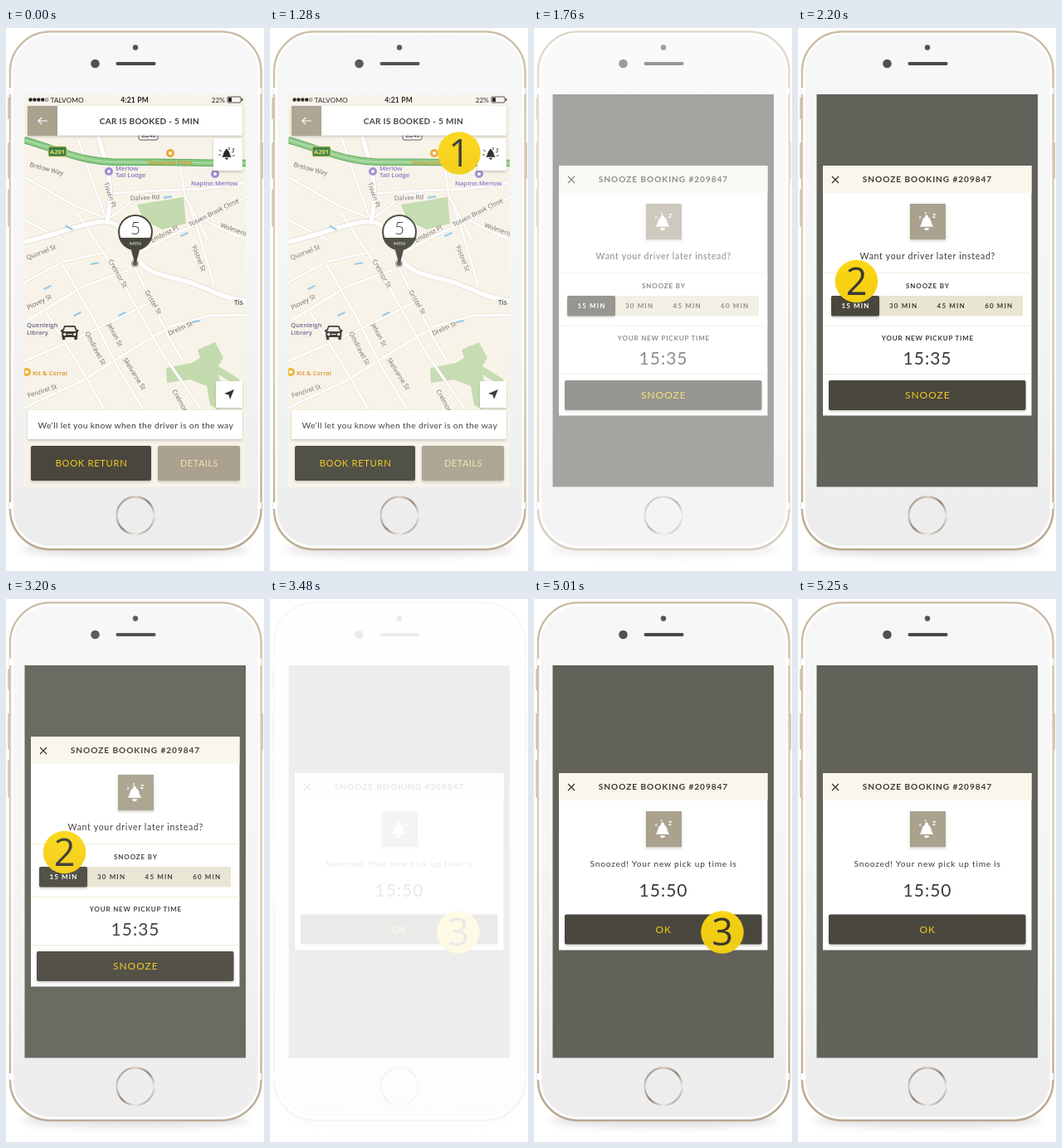
Write an HTML page that moves like this. It is 311 px wide and 655 px high and loops after 5.37 s.

```html
<!DOCTYPE html>
<html lang="en">
<head>
<meta charset="utf-8">
<title>Snooze a booking</title>
<style>
html, body { margin: 0; width: 100%; height: 100%; overflow: hidden; background: #fff; }
svg { display: block; width: 311px; height: 655px; }
text { font-family: Lato, "Open Sans", sans-serif; }
.badge text { font-family: "Open Sans", "Noto Sans", sans-serif; }
.map text { font-family: "Open Sans", sans-serif; }
</style>
</head>
<body>
<svg id="stage" viewBox="0 0 311 655"></svg>
<script>
const DARK = '#48473e', TAN = '#aaa18f', GOLD = '#f2cb1d', INK = '#3b3a34', CREAM = '#f9f6ec';

const rect = (x, y, w, h, fill, extra = '') =>
  `<rect x="${x}" y="${y}" width="${w}" height="${h}" fill="${fill}" ${extra}/>`;
const dot = (x, y, r, fill, extra = '') =>
  `<circle cx="${x}" cy="${y}" r="${r}" fill="${fill}" ${extra}/>`;
const line = (d, color, width, extra = '') =>
  `<path d="${d}" fill="none" stroke="${color}" stroke-width="${width}" ${extra}/>`;
const text = (s, x, y, size, { fill = INK, weight = 400, space = 0, anchor = 'middle', turn = 0 } = {}) =>
  `<text transform="translate(${x} ${y}) rotate(${turn})" font-size="${size}" fill="${fill}"
    font-weight="${weight}" letter-spacing="${space}" text-anchor="${anchor}">${s}</text>`;
const SHADOW = 'filter="url(#shadow)"';

const bell = (x, y, s, fill) => `<g transform="translate(${x} ${y}) scale(${s})" fill="${fill}">
  <path d="M-9 5C-5 2-7-7 0-8 7-7 5 2 9 5Z"/><circle cy="-8" r="2"/><path d="M-3 6.5H3A3 3 0 0 1-3 6.5Z"/></g>`;

function phone() {
  const side = (x, y, h) => rect(x, y, 2.5, h, '#cfc2ae', 'rx="1"');
  const bands = [[4, 72], [4, 572], [303.5, 72], [303.5, 572]];
  return `
    <ellipse cx="156" cy="629" rx="138" ry="9" fill="#999" opacity=".28" filter="url(#soft)"/>
    ${side(2.2, 84, 26)}${side(2.2, 138, 44)}${side(2.2, 194, 46)}${side(307.5, 138, 44)}
    ${rect(5, 4.5, 302.5, 624.5, 'url(#body)', 'rx="48" stroke="url(#rim)" stroke-width="2.6"')}
    ${rect(7.5, 7, 297.5, 619, 'none', 'rx="45.5" stroke="#fff" stroke-width="2.4"')}
    ${bands.map(([x, y]) => rect(x, y, 4.5, 8, '#fff')).join('')}
    ${dot(156, 23.5, 3.2, '#55524f')}${dot(107.5, 43, 5.3, '#55504d')}
    ${rect(132.5, 41, 48, 4, '#4b4744', 'rx="2"')}
    ${dot(156, 588, 22.5, 'none', 'stroke="url(#ring)" stroke-width="2.4"')}`;
}

function map() {
  const small = [
    'M22 180L82 214 122 230', 'M22 307L68 282 122 270', 'M22 355L92 312 148 292',
    'M22 402L77 378 132 352 173 331', 'M22 458L95 424 152 388 198 360 245 347 289 346',
    'M85 222L139 304 187 390 235 460', 'M66 282L105 350 133 406 165 460',
    'M48 342L102 430 118 460', 'M153 284L197 374 213 402', 'M122 200L184 196 238 194 289 186',
    'M122 232L157 205 185 200', 'M160 271L200 250 240 232 289 204', 'M217 205L230 240 251 310',
    'M240 232L289 256', 'M86 132L104 184 120 229', 'M210 165L216 204 245 258', 'M23 232L70 256'];
  const oneWay = [[50, 313, -27], [86, 345, -28], [144, 235, 25], [76, 241, 28], [215, 249, -25],
    [195, 204, -8], [229, 354, -12], [140, 345, -24], [107, 284, -10]];
  const labels = [
    ['Brelow Way', 28, 167, 15], ['Tisven Pl', 118, 187, 72], ['Dalvex Rd', 150, 208, -3],
    ['Quorvel St', 26, 280, -22], ['Embrist Pl', 176, 259, -27], ['Tolven Brask Close', 222, 240, -27],
    ['Wolmerd', 258, 240, 19], ['Yostrel St', 224, 263, 69], ['Crelmor St', 123, 281, 60],
    ['Plovey St', 27, 340, -27], ['Gristel St', 167, 318, 60], ['Drelm St', 197, 371, -24],
    ['Omdravel St', 95, 368, 62], ['Jelvan St', 122, 358, 62], ['Skelvarne St', 141, 400, 58],
    ['Fenzirel St', 27, 446, -18], ['Crelmor', 200, 438, 60]];
  const main = 'M22 258C65 248 85 238 112 234S145 252 157 276 201 299 225 308 262 326 289 329';
  const rodney = 'M111 130C119 160 132 188 122 233';
  const green = 'M22 135C50 143 70 152 98 158S150 161 200 162 250 163 289 163';
  const place = (s, x, y, fill) => text(s, x, y, 7.6, { fill, weight: 600, anchor: 'start' });
  const pin = (x, y, fill) => dot(x, y, 5, fill) + dot(x, y, 2, '#fff');
  return `<g class="map" clip-path="url(#screen)">
    ${rect(22, 80, 267, 381, '#f8f3e8')}
    <path d="M158 213L214 204 217 236 188 243 166 232Z M231 388L252 379 262 398 256 408 282 424 276 430 256 418 262 440 256 460 246 455 242 432 222 424 194 428 193 410 224 404 234 398Z" fill="#c3dbae"/>
    ${small.map(d => line(d, '#e2dcd2', 3.8) + line(d, '#fff', 2.8)).join('')}
    ${[main, rodney].map(d => line(d, '#ddd7cc', 7) + line(d, '#fff', 5.6)).join('')}
    ${line(green, '#5da660', 8.5) + line(green, '#8bcb85', 6.5) + line(green, '#c5e5bc', 1)}
    ${oneWay.map(([x, y, a]) => rect(-5, -1.2, 10, 2.4, '#9bcde6', `transform="translate(${x} ${y}) rotate(${a})"`)).join('')}
    ${rect(51, 143, 22, 12, '#317e49', 'rx="2" stroke="#e8cc59"')}
    ${text('A201', 62, 152, 7.5, { fill: '#f8de53', weight: 700 })}
    ${rect(160, 123, 23, 12, '#fff', 'rx="2" stroke="#555"')}${text('B240', 172, 132, 7.5, { weight: 600 })}
    ${labels.map(([s, x, y, turn]) => text(s, x, y, 7.7, { turn, fill: '#67645f', anchor: 'start' })).join('')}
    ${text('Tis', 275, 334, 8, { fill: '#555', weight: 600, anchor: 'start' })}
    ${pin(124, 173, '#9a8bd3')}${place('Merlow', 132, 172, '#8271c5')}${place('Tall Lodge', 132, 180, '#8271c5')}
    ${pin(252, 176, '#9a8bd3')}${place('NapInn Merlow', 223, 190, '#8271c5')}
    ${pin(198, 151, '#e8a83c')}${place('Tamarind Plate', 170, 165, '#d59024')}
    ${place('Quenleigh', 25, 361, '#6a6590')}${place('Library', 25, 370, '#6a6590')}
    ${pin(25, 415, '#edb72d')}${place('Kit &amp; Corral', 32, 419, '#d59024')}
  </g>`;
}

function car() {
  return `<g transform="translate(76.8 367)" fill="#3a3934">
    <path d="M-6.5-8H6.5L9.5-1V6H-9.5V-1Z"/><path d="M-11-3H-8V0H-10ZM11-3H8V0H10ZM-9 5H-5.5V9H-9ZM9 5H5.5V9H9Z"/>
    <path d="M-5.5-6.3H5.5L7.5-1H-7.5Z" fill="#f4eee3"/>
    <circle cx="-6" cy="2.5" r="1.7" fill="#f4eee3"/><circle cx="6" cy="2.5" r="1.7" fill="#f4eee3"/>
    <path d="M-3 2.5H3" stroke="#f4eee3"/></g>`;
}

function marker() {
  return `${dot(155.5, 284, 4.5, '#aaa69d')}${dot(155.5, 284, 2.5, '#5c5a53')}
    <path d="M150 264L155 283H157L162 264Z" fill="${DARK}"/>
    ${dot(156, 246, 20, '#fff', `stroke="${DARK}" stroke-width="2"`)}
    <path d="M136 253H176A20.8 20.8 0 0 1 136 253Z" fill="${DARK}"/>
    ${text('5', 156, 249, 21, { weight: 300 })}${text('MIN', 156.3, 262, 6.5, { fill: '#fff', space: .6 })}`;
}

function booked() {
  const signal = [29.5, 34.4, 39.3, 44.2].map(x => dot(x, 86.5, 2.2, '#222')).join('');
  return `${map()}${rect(22, 461, 267, 92.5, '#f8f3ea')}${rect(22, 80, 267, 14, '#f8f3ea')}
    ${signal}${dot(49.1, 86.5, 1.8, 'none', 'stroke="#222" stroke-width=".7"')}
    ${text('TALVOMO', 53.5, 89.7, 8.4, { fill: '#222', anchor: 'start' })}
    ${text('4:21 PM', 155, 89.7, 8.5, { fill: '#222', weight: 700, space: .2 })}
    ${text('22%', 264, 89.7, 8.3, { fill: '#222', anchor: 'end' })}
    ${rect(267, 83, 16, 7, 'none', 'rx="1" stroke="#222" stroke-width=".8"')}
    ${rect(268, 84, 4, 5, '#222')}${rect(284, 85, 1.2, 3, '#222')}
    ${rect(26, 94, 259, 35.5, '#fff', SHADOW)}${rect(26, 94, 36, 36, TAN)}
    ${line('M50 112H39M43 108L39 112 43 116', '#fff', 1.2)}
    ${text('CAR IS BOOKED - 5 MIN', 173, 115.5, 10, { weight: 700, space: .34 })}
    ${rect(250, 133, 35, 39, '#fff', SHADOW)}${bell(266, 152.5, .65, '#292824')}
    ${line('M260 149L257 147M259 153H256M272 150L275 149M273 154H276', '#292824', .8)}
    ${text('z', 269, 147, 5, { weight: 700 })}${text('z', 274, 148, 6, { weight: 700 })}
    ${rect(253, 426, 32, 32, '#fff', SHADOW)}<path d="M275 436L270 448 268.5 442.5 263 441Z" fill="#33322e"/>
    ${car()}${marker()}
    ${rect(26, 461, 259, 35, '#fff', `rx="2" ${SHADOW}`)}
    ${text('We’ll let you know when the driver is on the way', 156.3, 482.5, 10.4, { space: .31 })}
    ${rect(30, 504, 145, 42, DARK, `rx="2" ${SHADOW}`)}
    ${text('BOOK RETURN', 103, 529, 11.2, { fill: GOLD, space: .68 })}
    ${rect(183, 504, 99, 42, TAN, `rx="2" ${SHADOW}`)}
    ${text('DETAILS', 233, 529, 11, { fill: '#f1e3b0', space: .5 })}`;
}

function dialog(top, height) {
  const icon = top + 69;
  return `${rect(22.5, 80, 266.5, 473.5, '#62615a')}
    ${rect(30, top, 251.5, height, '#fff')}${rect(30, top, 251.5, 33, CREAM)}
    ${line(`M41 ${top + 13}l8 8m0 -8l-8 8`, '#33322e', 1.2)}
    ${text('SNOOZE BOOKING #209847', 156, top + 20, 10.2, { weight: 700, space: .9 })}
    ${rect(135, top + 46, 43, 43, TAN, SHADOW)}${bell(155, icon, .95, '#fff')}
    ${text('z', 147, icon - 5, 6, { fill: '#fff', weight: 700 })}
    ${text('z', 154, icon - 10, 5, { fill: '#fff', weight: 700 })}
    ${text('z', 164, icon - 6, 9, { fill: '#fff', weight: 700 })}`;
}

const wideButton = (label, y) => rect(37, y, 237.5, 36, DARK, `rx="2" ${SHADOW}`) +
  text(label, 156.3, y + 22, 12, { fill: GOLD, space: 1 });
const pickupTime = (s, y) => text(s, 156, y, 21, { space: 1 });

function snooze() {
  const rules = [295.5, 359.5, 417.5].map(y => line(`M30 ${y}H281.5`, '#f3ebdd', 1)).join('');
  const choices = [15, 30, 45, 60].map((n, i) => text(`${n} MIN`, 69.5 + 57.6 * i, 338, 8,
    { weight: 700, space: 1.15, fill: i ? INK : '#fff' })).join('');
  return `${dialog(166, 301.5)}
    ${text('Want your driver later instead?', 156.3, 279, 10.6, { space: .67 })}${rules}
    ${text('SNOOZE BY', 156.4, 314, 8, { weight: 700, space: .85 })}
    ${rect(40, 323, 231, 24.5, '#e9e5d3')}${rect(40, 323, 58, 24.5, DARK, `rx="2" ${SHADOW}`)}${choices}
    ${text('YOUR NEW PICKUP TIME', 156.4, 377, 8, { weight: 700, space: .8 })}
    ${pickupTime('15:35', 406)}${wideButton('SNOOZE', 425)}`;
}

function snoozed() {
  return `${dialog(210, 213.5)}
    ${text('Snoozed! Your new pick up time is', 156.2, 323, 10.2, { space: .78 })}
    ${pickupTime('15:50', 358.5)}${wideButton('OK', 380.5)}`;
}

const badge = (n, x, y) => `<g class="badge">${dot(x, y, 25.8, 'url(#yellow)')}
  ${text(n, x, y + 16, 45, { fill: '#393833' })}</g>`;

const stops = (...colors) => colors.map((c, i) =>
  `<stop offset="${i / (colors.length - 1)}" stop-color="${c}"/>`).join('');
const screens = [booked() + badge(1, 228, 151), snooze() + badge(2, 70.5, 305.5), snoozed() + badge(3, 227, 402)];

const stage = document.getElementById('stage');
stage.innerHTML = `<defs>
  <linearGradient id="body" x2="0" y2="1">${stops('#f7f7f7', '#f5f5f5', '#ececec')}</linearGradient>
  <linearGradient id="rim" x2="0" y2="1">${stops('#c9baa2', '#d9ccb8', '#d5c7b2', '#b9a88f')}</linearGradient>
  <linearGradient id="ring" x2="1" y2="1">${stops('#7b6f66', '#d9cec4', '#8d7d70', '#efe9e4', '#77695d')}</linearGradient>
  <linearGradient id="yellow" x2="0" y2="1">${stops('#fbd714', '#f3cd12')}</linearGradient>
  <clipPath id="screen"><rect x="22" y="80" width="267" height="381"/></clipPath>
  <filter id="shadow" x="-20%" y="-20%" width="140%" height="150%">
    <feDropShadow dx="0" dy="1.5" stdDeviation="1.5" flood-color="#4a4438" flood-opacity=".3"/></filter>
  <filter id="soft" x="-10%" y="-50%" width="120%" height="200%"><feGaussianBlur stdDeviation="4"/></filter>
  </defs><g id="phone">${phone()}${screens.map(s => `<g class="view">${s}</g>`).join('')}</g>`;

const LOOP = 5370, STEP = 40;
// Rows of [time, value]; values ease from row to row.
const PHONE = [[0, 1], [1240, 1], [1520, 0], [1960, 1], [3160, 1], [3430, 0], [3680, 1]];
const BADGES = [
  [[0, 0], [280, 1]],
  [[1960, 0], [2200, 1]],
  [[4970, 1], [5250, 0]]
];

function valueAt(rows, t) {
  const next = rows.findIndex(row => row[0] > t);
  if (next < 0) return rows[rows.length - 1][1];
  if (next === 0) return rows[0][1];
  const [t0, a] = rows[next - 1], [t1, b] = rows[next];
  const p = (t - t0) / (t1 - t0);
  return a + (b - a) * p * p * (3 - 2 * p);
}

const phoneNode = document.getElementById('phone');
const views = [...document.querySelectorAll('.view')];
const badges = [...document.querySelectorAll('.badge')];
const start = performance.now();

function draw(now) {
  const t = Math.floor(Math.max(0, now - start) % LOOP / STEP) * STEP;
  const current = t < 1520 ? 0 : t < 3430 ? 1 : 2;
  phoneNode.setAttribute('opacity', valueAt(PHONE, t));
  views.forEach((view, i) => view.setAttribute('display', i === current ? 'inline' : 'none'));
  badges.forEach((node, i) => node.setAttribute('opacity', valueAt(BADGES[i], t)));
}

function tick(now) {
  draw(now);
  requestAnimationFrame(tick);
}
draw(start);
requestAnimationFrame(tick);
</script>
</body>
</html>
```
